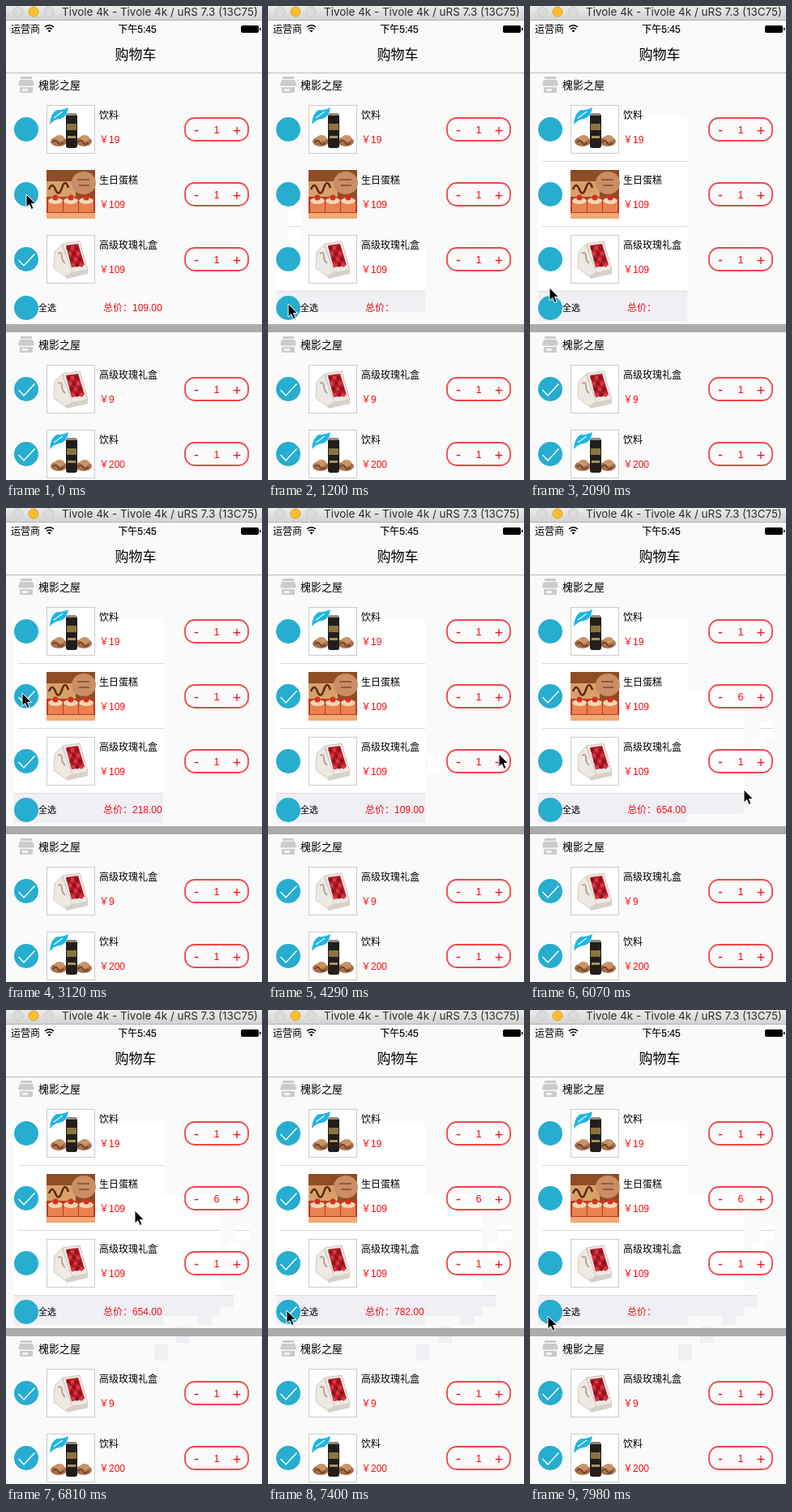
Write an HTML page that moves like this. It is 316 by 584 pixels and loops after 8000 ms.

```html
<!DOCTYPE html>
<html lang="zh">
<head>
<meta charset="utf-8">
<style>
html, body { margin: 0; width: 100%; height: 100%; overflow: hidden; background: #fafafa; }
svg { display: block; font-family: "Liberation Sans", "Noto Sans CJK SC", "Noto Sans CJK", sans-serif; }
</style>
</head>
<body>
<svg id="stage" width="316" height="584" viewBox="0 0 316 584"></svg>
<script>
const LOOP = 8000, STEP = 147.7, RED = '#f60d12', BLUE = '#27adcf';
const $ = id => document.getElementById(id);
const rowY = i => 152 + 80 * i;

// Drawing helpers
const rect = (x, y, w, h, fill, more = '') =>
  `<rect x="${x}" y="${y}" width="${w}" height="${h}" fill="${fill}" ${more}/>`;
const path = (d, fill, more = '') => `<path d="${d}" fill="${fill}" ${more}/>`;
const line = (d, color, width) => path(d, 'none', `stroke="${color}" stroke-width="${width}"`);
const dot = (x, y, r, fill, more = '') => `<circle cx="${x}" cy="${y}" r="${r}" fill="${fill}" ${more}/>`;
const oval = (x, y, rx, ry, fill) => `<ellipse cx="${x}" cy="${y}" rx="${rx}" ry="${ry}" fill="${fill}"/>`;
const label = (x, mid, size, str, more = '') =>
  `<text x="${x}" y="${mid + size * .37}" font-size="${size}" ${more}>${str}</text>`;
const at = (x, y, body) => `<g transform="translate(${x} ${y})">${body}</g>`;
const repeat = (n, fn) => Array.from({ length: n }, (_, i) => fn(i)).join('');

const frame = rect(.5, .5, 59, 59, '#fff', 'stroke="#ccc"');
const nut = x => at(x, 45, oval(0, 0, 10, 6, '#a9714a') + oval(1, -4, 6, 4, '#c99467') +
  line('M-7 1q4 -5 6 0t7 0', '#66371f', 1.5));

const photos = {
  drink: frame + path('M4 24Q5 9 13 6Q20 7 27 3Q25 16 16 17Q9 18 4 24Z', '#1fb5e2') +
    line('M9 16L20 8', '#d9f5ff', 1.5) + nut(15) + nut(46) +
    rect(24, 11, 14, 42, '#221e1c', 'rx="3"') + rect(25, 10, 12, 3, '#92897b', 'rx="1"') +
    rect(25, 23, 12, 8, '#8b7440') + rect(26, 38, 10, 3, '#af9256'),
  cake: rect(0, 0, 60, 60, '#8f4d25') + rect(0, 14, 36, 20, '#d8a16a') +
    line('M3 24q4 -10 8 0t8 -2t8 0', '#5a2914', 2.5) +
    oval(46, 16, 15, 14, '#c98e66') + line('M38 12h15M40 19h13', '#8b452c', 1.5) +
    rect(0, 33, 60, 27, '#bd3c20') +
    repeat(3, i => at(11 + 19 * i, 37, rect(-9, 3, 18, 12, '#e98250') + oval(0, 1, 9, 4, '#f4d7b4') + dot(0, -3, 3.5, '#d62f22'))) +
    rect(0, 53, 60, 7, '#efaa77'),
  roses: frame + path('M20 11L41 8L51 43L30 47Z', '#f0e9e3', 'stroke="#cbc3b9"') +
    path('M24 13L39 11L47 37L31 40Z', '#b51c28') +
    repeat(12, i => dot(27 + i % 3 * 5 + (i / 3 | 0) * 2, 16 + (i / 3 | 0) * 7, 2.5, i % 2 ? '#dc3640' : '#8d1420')) +
    path('M10 21L19 12L32 46L23 51L9 41Z', '#eee9e3', 'stroke="#d0c8bf"') +
    line('M14 23q5 -3 5 3t4 9', '#b9a294', 2) + path('M23 51L32 46L51 43V48L25 54Z', '#d8d1c8')
};

const check = (y, id) => dot(25, y, 15, BLUE) +
  path(`M15.500 ${y + 1}l6.500 7L35.500 ${y - 6.5}`, 'none', `id="${id}" stroke="#fff" stroke-width="1.4"`);

function item(y, photo, name, price, id) {
  const red = `fill="${RED}"`, mid = red + ' text-anchor="middle"';
  return check(y, 'tick' + id) + at(50, y - 30, photos[photo]) +
    label(115, y - 17, 12, name) + label(115, y + 13, 12, '￥' + price, red) +
    rect(221, y - 14, 78, 28, 'none', 'rx="12" stroke="#f04648" stroke-width="1.8"') +
    label(235, y, 18, '-', mid) + label(285, y + 1, 18, '+', mid) +
    label(260, y, 13, '1', `id="count${id}" ${mid}`);
}

const shop = y => at(15, y - 10,
  path('M3 0H17V3H3ZM2 4H18L20 10Q18 13 15 11Q12 13 10 11Q7 13 5 11Q2 13 0 10ZM2 13H18V20H2Z', '#cbcbcb') +
  rect(5, 15, 7, 3, '#f2f2f2')) + label(40, y, 13, '槐影之屋');

const chrome =
  '<linearGradient id="bar" x2="0" y2="1"><stop stop-color="#ebebeb"/><stop offset="1" stop-color="#d3d3d3"/></linearGradient>' +
  rect(0, 0, 316, 17, 'url(#bar)') + rect(0, 17, 316, 1, '#b4b4b4') +
  repeat(3, i => dot(15 + 19 * i, 7, 6, i === 1 ? '#fdbd2e' : '#dcdcdc', `stroke="${i === 1 ? '#dfa023' : '#c9c9c9'}"`)) +
  label(69, 7, 13.45, 'Tivole 4k - Tivole 4k / uRS 7.3 (13C75)', 'fill="#2c2c2c" font-family="Inter, sans-serif"') +
  label(6, 28.5, 12, '运营商') +
  line('M48 26Q53.500 21.500 59 26M50 28.500Q53.500 25.500 57 28.500', '#000', 1.5) +
  path('M51.500 30.500Q53.500 29 55.500 30.500L53.500 32.500Z', '#000') +
  label(162, 28.5, 12, '下午5:45', 'font-weight="500" text-anchor="middle" stroke="#000" stroke-width=".2"') +
  rect(290, 24, 22, 9, '#000', 'rx="2"') + rect(313, 27, 1.5, 3, '#000') +
  label(160, 60, 17, '购物车', 'font-weight="500" text-anchor="middle"') +
  rect(0, 82, 316, 1, '#bdbdbd');

// Pointer path: step, x, y, straight between points
const route = [
  [0, 25, 232], [4, 22, 309], [6, 22, 309], [8, 25, 367], [13, 25, 367], [16, 22, 308], [18, 22, 308],
  [21, 20, 228], [24, 22, 312], [26, 22, 312], [29, 285, 303], [31, 282, 228], [39, 282, 228],
  [41, 264, 347], [44, 183, 413], [46, 159, 247], [48, 24, 366], [54, 22, 377]
];
function pointer(step) {
  const i = Math.max(1, route.findIndex(p => p[0] >= step));
  const [s0, x0, y0] = route[i - 1], [s1, x1, y1] = route[i], k = (step - s0) / (s1 - s0);
  return [x0 + (x1 - x0) * k, y0 + (y1 - y0) * k];
}

// What is clicked at which step: a row's checkbox, 'all', or '+' on the cake
const clicks = { 4: 2, 10: 'all', 13: 'all', 16: 2, 20: 1, 26: 2, 33: '+', 35: '+', 36: '+', 37: '+', 40: '+', 50: 'all', 53: 'all' };
const prices = [19, 109, 109];

function click(cart, what) {
  const { count } = cart, ticks = [...cart.ticks], all = ticks.every(Boolean);
  if (what === '+') return { ticks, count: count + 1 };
  if (what === 'all') return { ticks: ticks.map(() => !all), count };
  if (what !== undefined) ticks[what] = !ticks[what];
  return { ticks, count };
}
const isAll = cart => cart.ticks.every(Boolean);
const sum = cart => prices.reduce((s, p, i) => s + cart.ticks[i] * p * (i === 1 ? cart.count : 1), 0);

// Box [left, top, right, bottom] around all that differs between two carts
function changedBox(a, b) {
  const boxes = [];
  a.ticks.forEach((on, i) => on !== b.ticks[i] && boxes.push([10, rowY(i) - 15, 40, rowY(i) + 15]));
  if (isAll(a) !== isAll(b)) boxes.push([10, 357, 40, 388]);
  if (sum(a) !== sum(b)) boxes.push([156, 367, 194, 377]);
  if (a.count !== b.count) boxes.push([256, 227, 264, 237]);
  return boxes.length && [0, 1, 2, 3].map(k => Math[k < 2 ? 'min' : 'max'](...boxes.map(b => b[k])));
}

// Whatever changes, or the pointer leaves, uncovers the clean rows below
const carts = [{ ticks: [false, false, true], count: 1 }], cleared = [];
for (let step = 1; step * STEP < LOOP; step++) {
  const before = carts[step - 1], cart = carts[step] = click(before, clicks[step]);
  const [x, y] = pointer(step - 1), box = changedBox(before, cart);
  if (step > 1) cleared.push({ step, box: [x, y - 1, x + 17, y + 19] });
  if (box) cleared.push({ step, box });
}

const rows = rect(0, 112, 316, 239, '#fff') + rect(0, 351, 316, 41, '#efeff4') + rect(0, 402, 316, 30, '#efeff4') +
  repeat(2, i => rect(15, 191 + 80 * i, 301, 1, '#d9d9dc')) + rect(0, 351, 316, 1, '#dddde1');

$('stage').innerHTML =
  `<clipPath id="clear">${cleared.map(({ box: [l, t, r, b] }, i) => rect(l, t, r - l, b - t, '#000', `id="area${i}"`)).join('')}</clipPath>` +
  rect(0, 0, 316, 584, '#fafafa') + `<g clip-path="url(#clear)">${rows}</g>` + rect(0, 392, 316, 10, '#ababab') +
  chrome + shop(97) +
  item(rowY(0), 'drink', '饮料', prices[0], 0) +
  item(rowY(1), 'cake', '生日蛋糕', prices[1], 1) +
  item(rowY(2), 'roses', '高级玫瑰礼盒', prices[2], 2) +
  check(372, 'tickAll') + label(40, 372, 11, '全选') +
  label(120, 372, 12, '总价：', `fill="${RED}"`) + label(156, 372, 12, '', `id="total" fill="${RED}"`) +
  shop(417) + item(rowY(4), 'roses', '高级玫瑰礼盒', 9, 4) + item(rowY(5), 'drink', '饮料', 200, 5) +
  path('M0 0V16L3.700 12.600L6.300 18.500L9 17.300L6.500 11.500H11.500Z', '#000', 'id="cursor" stroke="#fff"');

const show = (id, on) => $(id).style.display = on ? '' : 'none';

function draw(time) {
  const step = Math.floor(time % LOOP / STEP), cart = carts[step], total = sum(cart);
  $('cursor').setAttribute('transform', `translate(${pointer(step).map(Math.round)})`);
  cart.ticks.forEach((on, i) => show('tick' + i, on));
  show('tickAll', isAll(cart));
  $('count1').textContent = cart.count;
  $('total').textContent = total ? total.toFixed(2) : '';
  cleared.forEach((c, i) => show('area' + i, step >= c.step));
}

const began = performance.now();
function loop() {
  draw(performance.now() - began);
  requestAnimationFrame(loop);
}
loop();
</script>
</body>
</html>
```
